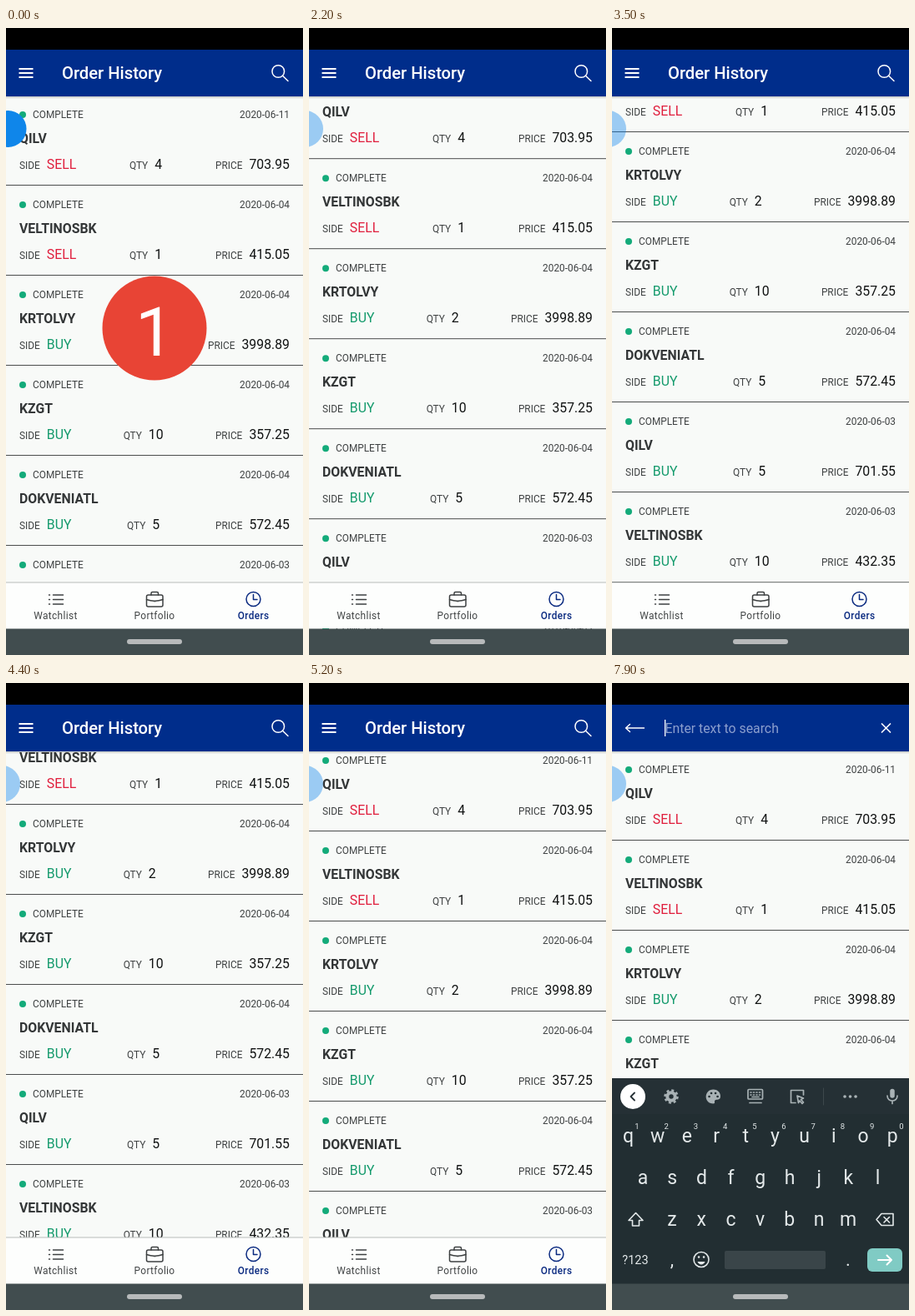
Recreate the animation shown at these times as an HTML page. Size 356 by 752 pixels, loop 8000 ms.

```html
<!DOCTYPE html>
<html lang="en">
<head>
<meta charset="utf-8">
<title>Order History</title>
<style>
  html, body { margin: 0; width: 100%; height: 100%; overflow: hidden; background: #000; }
  body { font-family: Roboto, sans-serif; }
  #stage { position: relative; width: 356px; height: 752px; overflow: hidden; background: #f8faf8; }
  #list { position: absolute; top: 81px; left: 0; width: 356px; }
  .order { position: relative; height: 107px; border-bottom: 1px solid #4b4d4d; color: #3e4142; font-size: 11.87px; }
  .order > div { position: absolute; left: 16px; right: 16px; height: 20px; line-height: 20px;
    display: flex; justify-content: space-between; align-items: baseline; white-space: nowrap; }
  .status { top: 13px; }
  .status span:first-child { padding-left: 16px; }
  .status::before { content: ""; position: absolute; left: 0; top: 6px; width: 8px; height: 8px; border-radius: 50%; background: #14ab7a; }
  .order .name { top: 42px; font-size: 15.82px; font-weight: 700; color: #333637; }
  .deal { top: 73px; }
  .deal b { margin-left: 8px; font-size: 15.82px; font-weight: 400; color: #101212; }
  .deal .SELL { color: #e01f3d; }
  .deal .BUY { color: #149a6c; }
  svg { position: absolute; left: 0; top: 0; }
  .line { fill: none; stroke-linecap: round; stroke-linejoin: round; }
</style>
</head>
<body>
<div id="stage">
  <div id="list"></div>
  <svg width="356" height="752" viewBox="0 0 356 752">
    <defs>
      <linearGradient id="shade" x1="0" y1="0" x2="0" y2="1">
        <stop offset="0" stop-color="#000" stop-opacity=".22"/>
        <stop offset="1" stop-color="#000" stop-opacity="0"/>
      </linearGradient>
    </defs>

    <rect y="82" width="356" height="3" fill="url(#shade)"/>
    <rect width="356" height="26"/>
    <rect y="26" width="356" height="56" fill="#002d8b"/>
    <g id="titleBar" class="line" stroke="#fff">
      <path d="M15.5 49H32.500M15.5 54H32.500M15.5 59H32.500" stroke-width="2" stroke-linecap="butt"/>
      <text x="67" y="61" font-size="20.2" font-weight="500" fill="#fff" stroke="none">Order History</text>
      <circle cx="326.300" cy="52" r="7.300" stroke-width="1.500"/>
      <path d="M331.500 57.300L338 63.500" stroke-width="1.500"/>
    </g>
    <g id="searchBar" class="line" stroke="#fff" stroke-width="1.400">
      <path d="M38.500 54H16.500M21.500 49.500L16.500 54L21.500 58.500"/>
      <text x="63.500" y="59.500" font-size="15.82" fill="#8c9fce" stroke="none">Enter text to search</text>
      <path d="M323.500 49L333.500 59M333.500 49L323.500 59" stroke-width="1.700"/>
    </g>
    <rect id="caret" x="63" y="44" width="1.300" height="20" fill="#fff"/>

    <rect y="665" width="356" height="55" fill="#fdfefd"/>
    <rect y="664.500" width="356" height="1" fill="#b9bdbc"/>
    <g class="line" stroke="#3d4041" stroke-width="1.500">
      <path d="M56.500 680H68.500M56.500 685.500H68.500M56.500 691H68.500M51.500 680H52.500M51.500 685.500H52.500M51.500 691H52.500"/>
      <rect x="168.500" y="680" width="19.500" height="14" rx="2"/>
      <path d="M174 680V678Q174 676.500 175.500 676.500H181Q182.500 676.500 182.500 678V680M168.500 685.500Q178 689 188 685.500M177 687.500H179.500"/>
      <g stroke="#0a2a80">
        <circle cx="296.500" cy="685" r="8.500"/>
        <path d="M296.500 679.500V685.500H301"/>
      </g>
    </g>
    <g font-size="11.87" letter-spacing=".35" text-anchor="middle" fill="#414445">
      <text x="59.500" y="709">Watchlist</text>
      <text x="178" y="709">Portfolio</text>
      <text x="296.700" y="709" font-weight="500" fill="#0a2a80">Orders</text>
    </g>

    <g id="keyboard">
      <rect y="474" width="356" height="278" fill="#222e32"/>
      <rect y="474" width="356" height="43" fill="#253035"/>
      <circle cx="25" cy="496" r="15" fill="#fff"/>
      <path class="line" d="M27 491.500L22.500 496L27 500.500" stroke="#253035" stroke-width="1.800"/>
      <g class="line" stroke="#a9b2b5" stroke-width="1.700">
        <circle cx="71" cy="496" r="4.700" stroke-width="4"/>
        <circle cx="71" cy="496" r="7.500" stroke-width="2.500" stroke-dasharray="3 2.890" stroke-linecap="butt"/>
        <path d="M121.500 487.500C110 487.500 109.500 504.500 121.500 504.500C124.500 504.500 122 501.500 123.500 500.500C125.500 499 130 501 130 495.500C130 490.500 126 487.500 121.500 487.500Z" fill="#a9b2b5" stroke="none"/>
        <path d="M116.500 496H116.600M119 492H119.100M124 492H124.100M126.500 496H126.600" stroke="#253035" stroke-width="2.600"/>
        <rect x="163" y="487.500" width="17.500" height="11.500" rx="1"/>
        <path d="M166 491H178M166 494H178" stroke-dasharray="1 2.500"/>
        <path d="M168 496.500H176M165 503.500H179"/>
        <path d="M229.500 494V488.500H214.500V503.500H220M222 495L229.500 498L226.500 499.500L229.500 503L228 504.500L225 501L223.500 503.500Z"/>
        <path d="M253.500 486V506" stroke="#3d484c" stroke-width="1"/>
        <path d="M279 496H279.100M285.500 496H285.600M292 496H292.100" stroke-width="3.600"/>
        <path d="M336 489.500V495" stroke-width="5.500"/>
        <path d="M330 495C330 503 342 503 342 495M336 501V504.500"/>
      </g>
      <g id="keys" text-anchor="middle" fill="#e4e9ea"></g>
      <g class="line" stroke="#e4e9ea" stroke-width="1.600">
        <path d="M28.500 635.500L20 644.500H24.500V651H32.500V644.500H37Z"/>
        <path d="M323 636.500H337V650.500H323L317 643.500ZM326 640.500L332.500 647M332.500 640.500L326 647"/>
        <circle cx="107" cy="691.500" r="9"/>
        <path d="M102.500 694C104 698.500 110 698.500 111.500 694Z" fill="#e4e9ea" stroke="none"/>
        <path d="M104 688.500H104.100M110 688.500H110.100" stroke-width="2.500"/>
      </g>
      <rect x="135" y="681" width="121" height="22" rx="2" fill="#3a4549"/>
      <rect x="306" y="678" width="42" height="28" rx="6" fill="#80cbc4"/>
      <path class="line" d="M319 692H335M329.500 686.500L335 692L329.500 697.500" stroke="#fff" stroke-width="2"/>
    </g>

    <rect y="720.500" width="356" height="32" fill="#414d4f"/>
    <rect x="145" y="733" width="66" height="6" rx="3" fill="#b7babb"/>

    <circle id="bubble" cy="121" r="22" fill="#0f86ea"/>
    <g id="countdown">
      <circle cx="178" cy="360" r="62.500" fill="#e84435"/>
      <text x="178" y="392.500" font-size="82" text-anchor="middle" fill="#fff">1</text>
    </g>
  </svg>
</div>
<script>
const LOOP = 8000, STEP = 100;
const el = id => document.getElementById(id);

const orders = [
  ["QILV", "SELL", 4, "703.95", "11"],
  ["VELTINOSBK", "SELL", 1, "415.05", "04"],
  ["KRTOLVY", "BUY", 2, "3998.89", "04"],
  ["KZGT", "BUY", 10, "357.25", "04"],
  ["DOKVENIATL", "BUY", 5, "572.45", "04"],
  ["QILV", "BUY", 5, "701.55", "03"],
  ["VELTINOSBK", "BUY", 10, "432.35", "03"],
];
el("list").innerHTML = orders.map(([name, side, qty, price, day]) => `
  <div class="order">
    <div class="status"><span>COMPLETE</span><span>2020-06-${day}</span></div>
    <div class="name">${name}</div>
    <div class="deal">
      <span>SIDE<b class="${side}">${side}</b></span>
      <span>QTY<b>${qty}</b></span>
      <span>PRICE<b>${price}</b></span>
    </div>
  </div>`).join("");

const label = (text, x, y, size) => `<text x="${x}" y="${y}" font-size="${size}">${text}</text>`;
const keyRow = (letters, x, y) => [...letters].map((c, i) => label(c, x + i * 35.2, y, 23)).join("");
el("keys").innerHTML =
  keyRow("qwertyuiop", 19.5, 551) + keyRow("asdfghjkl", 37, 601) + keyRow("zxcvbnm", 72, 651) +
  [..."1234567890"].map((c, i) => label(c, 30 + i * 35.2, 535, 9.5)).join("") +
  label("?123", 28, 697, 14.5) + label(",", 72, 699, 22) + label(".", 283, 699, 22);

// Scroll path: time, offset, speed in px per ms
const scrollPath = [
  [1700, 0, 0], [2600, 80, .12], [3500, 172, 0],
  [3700, 172, 0], [4400, 151, -.08], [5200, 11, -.15], [5300, 0, 0],
];
const progress = (t, from, to) => Math.min(1, Math.max(0, (t - from) / (to - from)));

function scrollAt(t) {
  const next = scrollPath.findIndex(p => p[0] > t);
  if (next < 1) return 0;
  const [t0, y0, v0] = scrollPath[next - 1], [t1, y1, v1] = scrollPath[next];
  const d = t1 - t0, u = (t - t0) / d, w = 1 - u;
  return y0 * w * w * (1 + 2 * u) + y1 * u * u * (3 - 2 * u) + d * u * w * (v0 * w - v1 * u);
}

function draw(now) {
  const t = Math.floor(now % LOOP / STEP) * STEP;
  el("list").style.transform = `translateY(${-scrollAt(t)}px)`;

  el("countdown").setAttribute("opacity", 1 - progress(t, 0, 200));
  const rest = progress(t, 200, 700);
  el("bubble").setAttribute("cx", 2.5 - 7.5 * rest);
  el("bubble").setAttribute("opacity", 1 - .6 * rest);

  const search = progress(t, 5500, 5900);
  el("titleBar").setAttribute("opacity", 1 - search);
  el("searchBar").setAttribute("opacity", search);
  el("caret").setAttribute("opacity", t >= 7300 ? 1 : 0);

  const hidden = 1 - progress(t, 7500, 7900);
  el("keyboard").setAttribute("transform", `translate(0 ${278 * hidden * hidden})`);
  requestAnimationFrame(draw);
}
requestAnimationFrame(draw);
</script>
</body>
</html>
```
